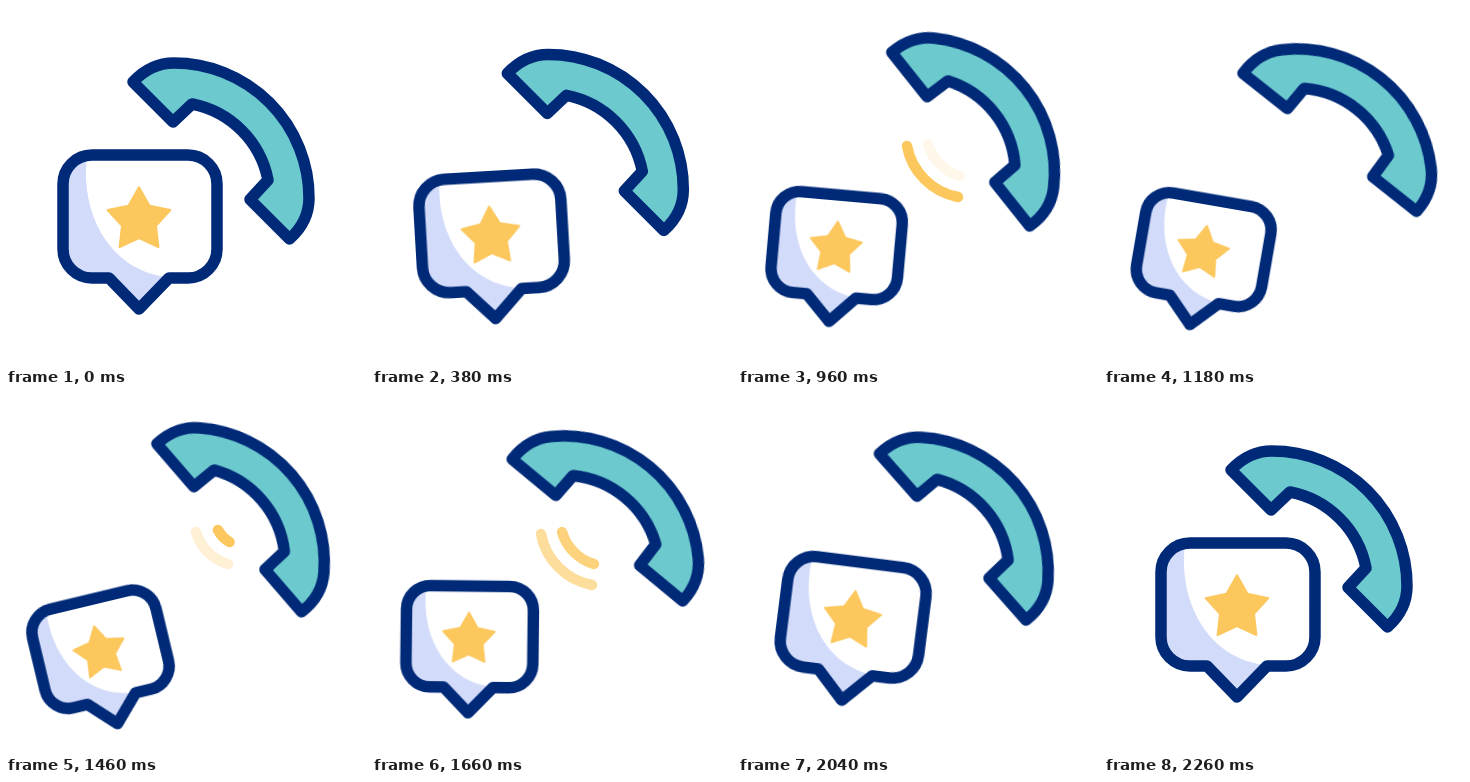
Recreate the animation shown at these times as an HTML page. Size 360 px wide and 360 px high, loop 2.4 s.

```html
<!DOCTYPE html>
<html lang="en">
<head>
<meta charset="utf-8">
<title>Call feedback</title>
<style>
html, body { margin: 0; width: 100%; height: 100%; overflow: hidden; background: #fff; }
svg { display: block; width: 100vw; height: 100vh; }

.line {
  stroke: #002a78; stroke-width: 11.5; stroke-linejoin: round;
  vector-effect: non-scaling-stroke;
}
.phone, .bubble { animation: 2400ms cubic-bezier(.37, 0, .63, 1) infinite; }
.phone {
  transform-origin: 219px 141px;
  animation-name: phone-move, phone-shake;
}
.bubble {
  transform-origin: 133px 226px;
  animation-name: bubble-move, bubble-sway, bubble-size;
}
@keyframes phone-move {
  0%, 8.75%, 94.4%, 100% { translate: 0 0; }
  24.17%, 76.67% { translate: 18.9px -19.6px; }
}
@keyframes phone-shake {
  0%, 23.1%, 94.4%, 100% { rotate: 0deg; }
  32.5%, 49.3%, 67.4% { rotate: -6.6deg; }
  40.6%, 58.3%, 76.46% { rotate: 6.6deg; }
}
@keyframes bubble-move {
  0%, 8.75%, 94.4%, 100% { translate: 0 0; }
  25.83% { translate: -36.3px 42.5px; }
  42.92% { translate: -36.3px 25px; }
  60% { translate: -36.3px 42px; }
  77.08% { translate: -36.3px 19.6px; }
}
@keyframes bubble-sway {
  0%, 8.75%, 94.4%, 100% { rotate: 0deg; }
  30.2%, 60.83% { rotate: -13.5deg; }
  45.8%, 76.9% { rotate: 13deg; }
}
@keyframes bubble-size {
  0%, 8.75%, 94.4%, 100% { scale: 1; }
  24.17%, 76.67% { scale: .824; }
}

/* Sound waves repeat every 800 ms; the gate lets two of three rounds show. */
.waves {
  fill: none; stroke: #fcc75c; stroke-width: 10.5; stroke-linecap: round;
  animation: gate 2400ms step-end infinite;
}
.waves path { animation: 800ms linear infinite; }
.waves .near { animation-name: near; }
.waves .mid { animation-name: mid; }
.waves .far { animation-name: far; }
@keyframes gate {
  0%, 83.33%, 100% { opacity: 0; }
  16.67% { opacity: 1; }
}
@keyframes near {
  0%, 58.75%, 100% { opacity: 0; }
  77.5% { opacity: 1; }
  83.75% { opacity: 1; stroke: #fcc75c; }
  88%, 100% { stroke: #c5bfad; }
}
@keyframes mid {
  0%, 3.75%, 96.25%, 100% { opacity: 1; }
  22.5%, 77.5% { opacity: 0; }
}
@keyframes far {
  0%, 100% { opacity: .2; }
  15%, 28.75% { opacity: 1; }
  47.5%, 96.25% { opacity: 0; }
}
</style>
</head>
<body>
<svg viewBox="0 0 360 360">
  <g class="waves">
    <path class="near" d="M212 136A30 30 0 0 0 223.5 148"/>
    <path class="mid" d="M190 138A47 47 0 0 0 222 170"/>
    <path class="far" d="M169 140A64 64 0 0 0 220 191"/>
  </g>
  <path class="phone line" fill="#6ccace" d="M127 76C139 63 152 57 168 57A135 135 0 0 1 303 192C303 208 297 221 283.5 233L244 193.5L262 174A96 96 0 0 0 186 98L167 116Z"/>
  <g class="bubble">
    <path fill="#fff" d="M86 149H182A29 29 0 0 1 211 178V243A29 29 0 0 1 182 272H163L133 303L103 272H86A29 29 0 0 1 57 243V178A29 29 0 0 1 86 149Z"/>
    <path fill="#d2dbf9" d="M81 150C74 207 103 264 161 271L133 299L103 272H86A29 29 0 0 1 57 243V178A29 29 0 0 1 81 150Z"/>
    <path class="line" fill="none" d="M86 149H182A29 29 0 0 1 211 178V243A29 29 0 0 1 182 272H163L133 303L103 272H86A29 29 0 0 1 57 243V178A29 29 0 0 1 86 149Z"/>
    <path fill="#fcc75c" stroke="#fcc75c" stroke-width="2" stroke-linejoin="round" d="M133 181.3L143.5 199.8L164.4 204.1L150 219.8L152.4 241L133 232.2L113.6 241L116 219.8L101.6 204.1L122.5 199.8Z"/>
  </g>
</svg>
</body>
</html>
```
